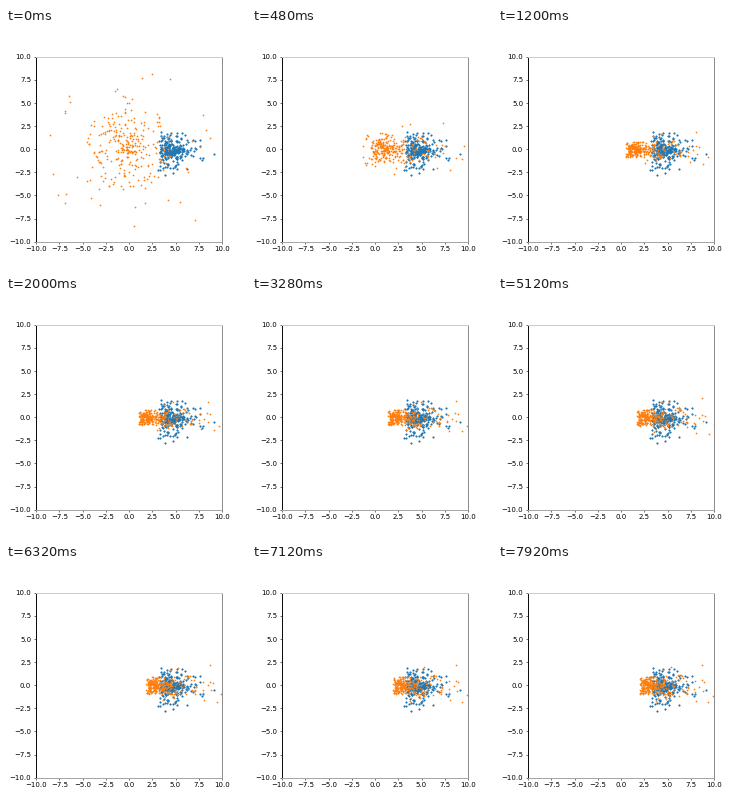
A matplotlib script for the animation above (8 s loop, 240x240 px).

```python
import numpy as np
import matplotlib.pyplot as plt
from matplotlib.animation import FuncAnimation

FRAMES, INTERVAL = 100, 80
rng = np.random.default_rng(11)


def match(sample, key):
    """Hand out the sorted sample in the order of key."""
    out = np.empty(len(key))
    out[np.argsort(key)] = np.sort(sample)
    return out


# fixed cloud: tight centre, long right tail
n_fixed = 256
fixed_x = 2.4 + rng.lognormal(0.75, 0.45, n_fixed)
fixed_y = rng.laplace(-0.15, 0.68, n_fixed)
fixed_y = -0.15 + 3.2 * np.tanh((fixed_y + 0.15) / 3.2)

# moving cloud: round core with scattered far points
n_core, n_far = 260, 36
n = n_core + n_far
r = np.append(4.8 * rng.random(n_core) ** 0.85, rng.uniform(5, 11, n_far))
angle = rng.uniform(0, 2 * np.pi, n)
start_x = r * np.cos(angle) - 0.1
start_y = r * np.sin(angle) + 0.2

# order along each axis is kept while the cloud is squeezed
reach = match(rng.lognormal(0.35, 0.98, n), start_x)
lift = match(np.clip(rng.normal(0, 1, n), -2.6, 2.6), start_y)
near = np.minimum(reach, 6)
phase = rng.uniform(0, 2 * np.pi, n)


def cloud(step):
    done = step / 79
    left = 0.6 + 0.73 * np.log(max(step, 8) / 12)
    x = left + (1.03 - 0.13 * done) * reach
    y = lift * (0.34 + 0.1 * done + (0.06 + 0.03 * done) * near) - 0.07
    y += 0.02 * near * np.sin(step / 9 + phase)
    w = np.exp(-step / 3)
    return x + w * (start_x - x), y + w * (start_y - y)


fig = plt.figure(figsize=(4.8, 4.8), dpi=50)
ax = fig.add_subplot()
ax.set(xlim=(-10, 10), ylim=(-10, 10))
ticks = np.arange(-10, 10.1, 2.5)
ax.set_xticks(ticks)
ax.set_yticks(ticks)
for side, shade in dict(left='0.05', right='0.55', top='0.8',
                        bottom='0.65').items():
    ax.spines[side].set(color=shade, linewidth=1.44)
ax.plot(fixed_x, fixed_y, '.', color='C0', ms=4)
dots, = ax.plot(*cloud(0), '.', color='C1', ms=3)


def update(i):
    # every fifth frame repeats the step before it
    dots.set_data(*cloud(i - (i + 2) // 5))
    return dots,


anim = FuncAnimation(fig, update, frames=FRAMES, interval=INTERVAL,
                     repeat=True, repeat_delay=0)
plt.show()
```
